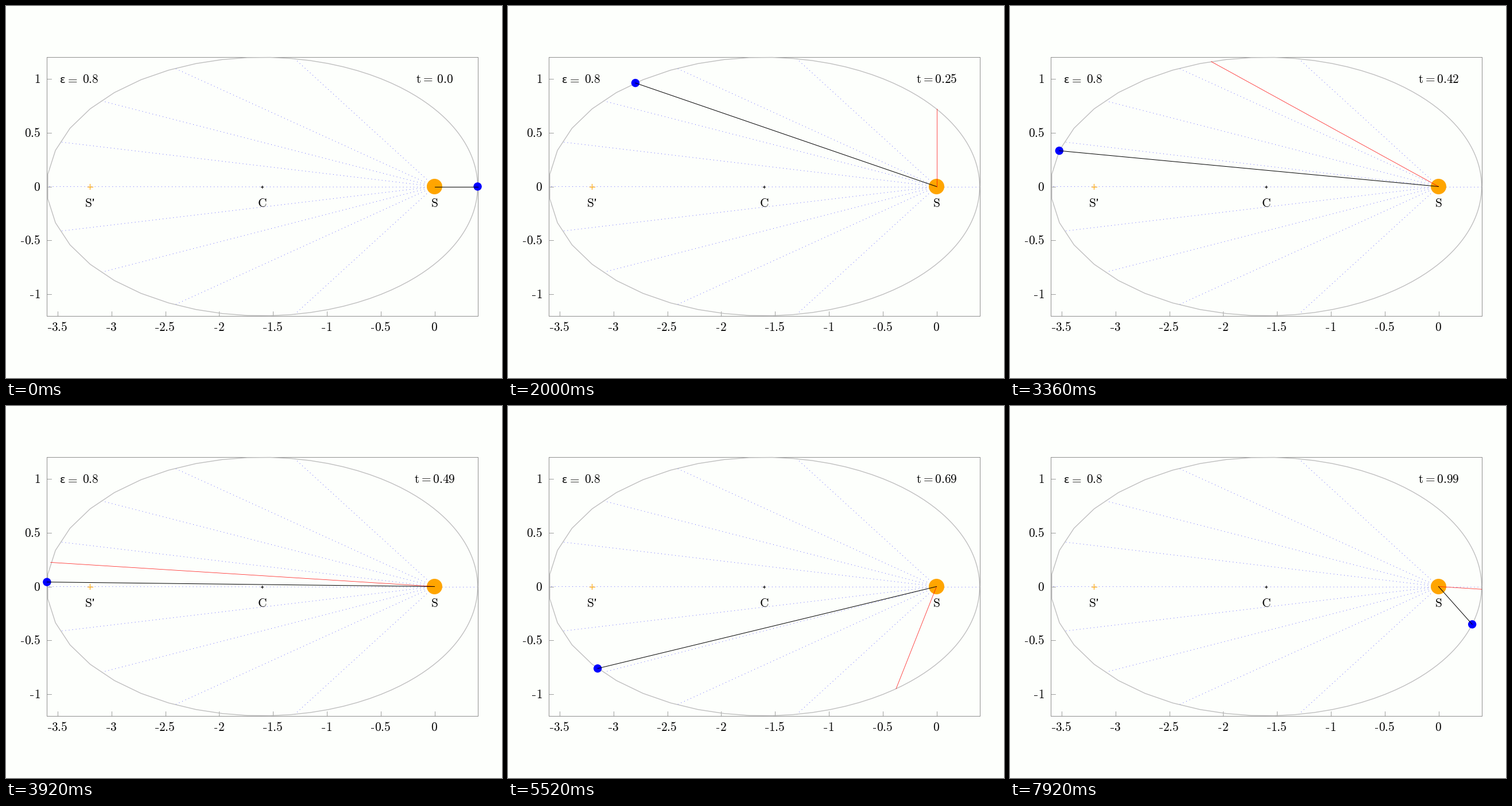
These frames come from a looping animation (864x648 px, 8000 ms). A matplotlib script:

```python
import numpy as np
import matplotlib.pyplot as plt
from matplotlib.animation import FuncAnimation
from matplotlib.patches import Circle, Polygon, Rectangle

W, H = 864, 648
FRAMES, INTERVAL = 100, 80
A, ECC = 2.0, 0.8                 # semi-major axis, eccentricity
B = A * np.sqrt(1 - ECC**2)
X0, Y0, SCALE = 746.5, 314.5, 187.6
FONT = 21.4                       # pixels per em

plt.rcParams["mathtext.fontset"] = "cm"
fig = plt.figure(figsize=(W / 72, H / 72), dpi=72, facecolor="#fdfffc")
ax = fig.add_axes([0, 0, 1, 1])
ax.set_xlim(0, W)
ax.set_ylim(H, 0)
ax.axis("off")


def px(x, y):
    """Plot units to stage pixels."""
    return X0 + SCALE * np.asarray(x), Y0 - SCALE * np.asarray(y)


def orbit_point(angle):
    """Point of the ellipse seen from the focus at a polar angle."""
    r = A * (1 - ECC**2) / (1 + ECC * np.cos(angle))
    return r * np.cos(angle), r * np.sin(angle)


def kepler(t):
    """Position of the planet after a fraction t of one period."""
    mean = 2 * np.pi * t
    lo, hi = 0.0, 2 * np.pi
    for _ in range(50):
        mid = (lo + hi) / 2
        if mid - ECC * np.sin(mid) < mean:
            lo = mid
        else:
            hi = mid
    return A * (np.cos(lo) - ECC), B * np.sin(lo)


def line(x, y, color, width, z, **kw):
    return ax.plot(x, y, color=color, lw=width, zorder=z, **kw)[0]


def roman(x, y, s, ha="center"):
    return ax.text(x, y, rf"$\mathrm{{{s}}}$", fontsize=FONT, ha=ha,
                   va="baseline", zorder=6)


def em_width(s):
    return sum(0.278 if c == "." else 0.5 for c in s) * FONT


def number(value, x, base, ha):
    """Tick label with a short hyphen as its minus sign."""
    digits = f"{abs(value):g}"
    hyphen = FONT / 3 if value < 0 else 0
    width = em_width(digits)
    right = x if ha == "right" else x + (width + hyphen) / 2
    roman(right, base, digits, "right")
    if value < 0:
        left = right - width - hyphen + 0.011 * FONT
        ax.add_patch(Rectangle((left, base - 0.245 * FONT), 0.265 * FONT,
                               0.058 * FONT, color="black", lw=0, zorder=6))


def draw_axes():
    left, top = px(-3.6, 1.2)
    right, bottom = px(0.4, -1.2)
    line([left, right, right, left, left], [top, top, bottom, bottom, top],
         "#909090", 1, 1)
    for v in np.arange(-3.5, 0.1, 0.5):
        x, _ = px(v, 0)
        line([x, x], [bottom, bottom - 7.4], "#888888", 0.8, 1)
        number(v, x, 566.5, "center")
    for v in np.arange(-1, 1.1, 0.5):
        _, y = px(0, v)
        line([left, left + 7.4], [y, y], "#888888", 0.8, 1)
        number(v, 60, y + 7, "right")


def plus(x, size, color):
    cx, cy = px(x, 0)
    line([cx - size, cx + size], [cy, cy], color, 1.1, 4)
    line([cx, cx], [cy - size, cy + size], color, 1.1, 4)


def draw_orbit():
    line(*px(*orbit_point(np.linspace(0, 2 * np.pi, 100))), "#bfbfbf", 1.4, 2)
    for k in range(10):
        x, y = kepler(k / 10)
        line(*px([0, x], [0, y]), "blue", 1, 1.5, alpha=0.6,
             linestyle=(0, (1, 5.1)), dash_capstyle="butt")
    ax.add_patch(Circle((X0, Y0), 13.5, color="orange", lw=0, zorder=3))
    plus(-3.2, 4.5, "orange")
    plus(-1.6, 2, "black")


def draw_labels():
    base = 350.5
    roman(X0, base, "S")
    roman(px(-1.6, 0)[0], base, "C")
    x, _ = px(-3.2, 0)
    roman(x - 0.139 * FONT, base, "S")
    x, y = x + 0.278 * FONT, base - 0.69 * FONT
    ax.add_patch(Polygon([(x - 1.1, y), (x + 1.1, y), (x + 0.9, y + 2.6),
                          (x - 0.4, y + 5), (x - 0.8, y + 4.6)],
                         color="black", lw=0, zorder=6))
    ax.text(98.3, 134.5, "ε", fontsize=18, family="DejaVu Sans",
            ha="center", va="baseline", zorder=6)
    roman(115, 134.5, "=")
    roman(133.3, 134.5, "0.8", "left")


draw_axes()
draw_orbit()
draw_labels()

mean_ray = line([], [], "red", 0.8, 4, alpha=0.85)
planet = ax.add_patch(Circle((0, 0), 7.2, color="blue", lw=0, zorder=4.5))
radius = line([], [], "black", 1, 5)
clock = roman(746.5, 134.5, "t")


def update(i):
    t = i / FRAMES
    x, y = kepler(t)
    mx, my = orbit_point(2 * np.pi * t)
    mean_ray.set_data(*px([0, mx], [0, my]))
    radius.set_data(*px([0, x], [0, y]))
    planet.center = px(x, y)
    pad = r"\:" if i % 10 == 0 else ""
    clock.set_text(rf"$\mathrm{{t = {pad}{t}}}$")
    return mean_ray, radius, planet, clock


anim = FuncAnimation(fig, update, frames=FRAMES, interval=INTERVAL,
                     repeat=True, repeat_delay=0, blit=False)
plt.show()
```
